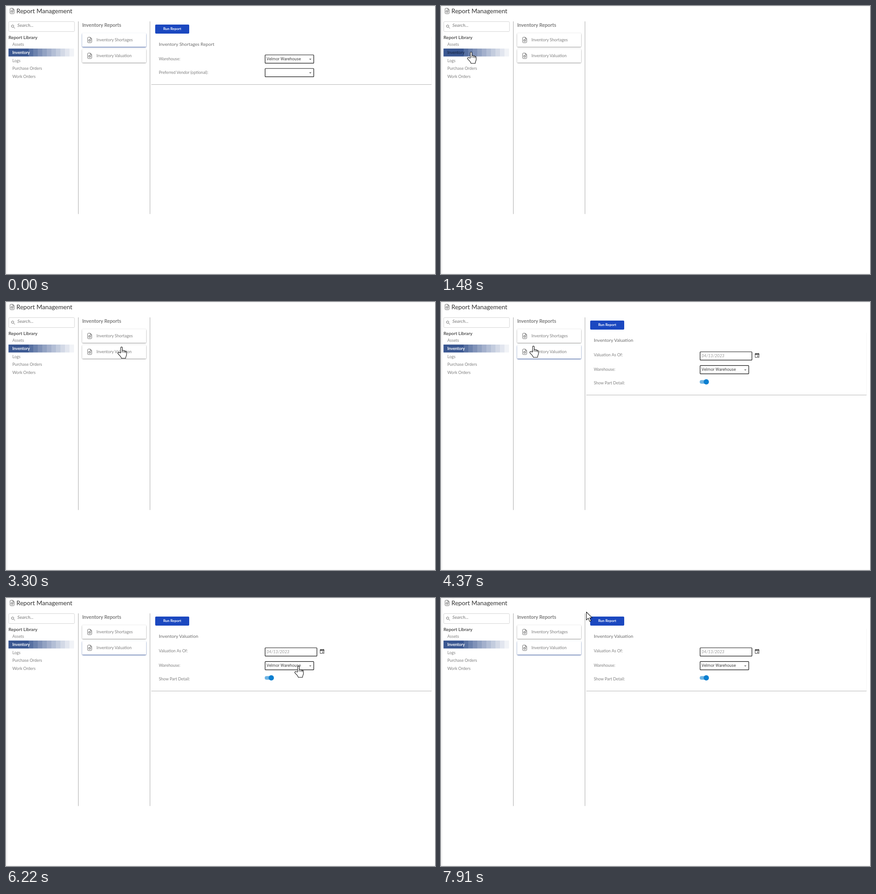
Write an HTML page that moves like this. It is 946x592 px and loops after 7990 ms.

```html
<!DOCTYPE html>
<html lang="en">
<head>
<meta charset="utf-8">
<title>Report Management</title>
<style>
html, body { margin: 0; width: 100%; height: 100%; overflow: hidden; background: #fff }
svg { display: block; width: 946px; height: 592px; font: 9px Lato, sans-serif; fill: #808080 }
.roboto { font-family: Roboto, sans-serif; fill: #444 }
.field { fill: #fff; stroke: #111; stroke-width: 1.2 }
.card { fill: #fff; filter: url(#soft) }
.card.on { filter: url(#blue) }
.cursor { fill: #fff; stroke: #111; stroke-width: 1.1; stroke-linejoin: round }
.icon { fill: none; stroke: #666 }
</style>
</head>
<body>
<svg viewBox="0 0 946 592">
  <defs>
    <filter id="soft" x="-5%" y="-20%" width="110%" height="150%"><feDropShadow dx="0" dy=".8" stdDeviation="1" flood-opacity=".5"/></filter>
    <filter id="blue" x="-5%" y="-20%" width="110%" height="150%"><feDropShadow dx="0" dy="1.2" stdDeviation="1" flood-color="#1f3f8c" flood-opacity=".85"/></filter>
    <linearGradient id="edge"><stop stop-color="#f1f1f1"/><stop offset="1" stop-color="#fff"/></linearGradient>
    <g id="doc" class="icon">
      <path d="M.5 2Q.5 .5 2 .5H6.5L9.5 3.5V11Q9.5 12.5 8 12.5H2Q.5 12.5 .5 11ZM6.5 .5V3.5H9.5"/>
      <path d="M5 5.3A2.3 2.3 0 1 0 7.3 7.6H5ZM6.2 4.7A2 2 0 0 1 8 6.4"/>
    </g>
  </defs>
  <rect width="5" height="592" fill="url(#edge)"/>
  <path d="M0 .5H946M0 591.5H946" stroke="#f0f0f0"/>
  <g id="page"></g>
  <g id="shortages"></g>
  <g id="valuation"></g>
  <path id="hand" class="cursor" d="M-2 13.5V1.9C-2 -.2 1.6 -.2 1.6 1.9V8.6C2.3 7.3 5 7.6 5.2 9.3C6 8.3 8.2 8.8 8.3 10.4C9.2 9.7 10.9 10.3 10.9 12V17C10.9 19.5 9 21 8.8 25.3H-.6C-.9 21.8 -4 20 -8 15.2C-9.2 13.3 -6.8 11.8 -5.2 12.8ZM1.6 8.6V12.5M5.2 9.3V13M8.3 10.4V13.5"/>
  <path id="arrow" class="cursor" d="M.6 .8V18.6L4.8 14.7L7.9 21.9L11 20.6L7.9 13.7H13.2Z"/>
</svg>
<script>
const LOOP = 7990;
const $ = id => document.getElementById(id);
const add = (id, html) => { $(id).innerHTML += html; };
const label = (x, y, text, attrs = '') => `<text x="${x}" y="${y}" ${attrs}>${text}</text>`;
const card = (id, y, text) => `<rect id="${id}" class="card" x="168" y="${y}" width="141" height="30" rx="2"/>
  <use href="#doc" x="179.5" y="${y + 8.5}"/>${label(199.5, y + 18.1, text, 'font-size="9.1"')}`;
const field = (y, width) => `<rect class="field" x="571.4" y="${y}" width="${width}" height="18.4" rx="1"/>`;
const select = (y, text) => field(y, 107.2) + label(574.5, y + 12, text, 'class="roboto"') +
  `<path d="M668.5 ${y + 8.6}h5l-2.5 2.7z" fill="#666"/>`;
const row = (y, text) => label(337, y, text);
const panel = (bottom, title) => `<path d="M320.5 ${bottom}H938.5" stroke="#b5b5b5"/>
  <path d="M938.5 68V${bottom}" stroke="#f5f5f5"/>
  <rect x="329" y="41" width="75" height="20" rx="2" fill="#1b48c0"/>
  ${label(366.5, 53.4, 'Run Report', 'font-size="7.9" font-weight="bold" text-anchor="middle" fill="#fff"')}
  ${label(337, 87.7, title, 'font-size="10.2" fill="#6c6c6c"')}`;

// Selected entry: solid blue, then ten-pixel bands fading to white
const band = i => {
  const fade = (i / 11) ** .8, rgb = [58, 87, 145].map(c => c + (255 - c) * fade);
  return `<rect x="${i ? 40 + 10 * i : 5.5}" y="94" width="${i ? 10 : 44.5}" height="17.5" fill="rgb(${rgb})"/>`;
};
const entries = ['Assets', 'Inventory', 'Logs', 'Purchase Orders', 'Work Orders'];

add('page', `<use href="#doc" x="8.5" y="4.5" style="stroke:#333"/>
  ${label(23, 16.3, 'Report Management', 'font-size="13.7" fill="#333"')}
  <rect x="6" y="34.5" width="145" height="22" rx="2" fill="#fff" stroke="#d4d4d4"/>
  <path class="icon" d="M16.9 46.9L19.5 49.5M12 44.5a2.6 2.6 0 1 0 5.2 0a2.6 2.6 0 1 0 -5.2 0"/>
  ${label(25, 46.3, 'Search...', 'font-size="10.2" font-style="italic" fill="#777"')}
  ${label(5.5, 73, 'Report Library', 'font-size="10" font-weight="bold" fill="#555"')}
  ${Array.from({ length: 11 }, (_, i) => band(i)).join('')}
  ${entries.map((name, i) => label(14, 88.4 + 17.55 * i, name, i === 1 ? 'id="entry"' : '')).join('')}
  <path d="M159.5 34V459.5M317.5 34V459.5" stroke="#aaa"/>
  ${label(168, 45.5, 'Inventory Reports', 'font-size="10.8" font-weight="bold" fill="#7d7d7d"')}
  ${card('first', 60, 'Inventory Shortages')}${card('second', 95, 'Inventory Valuation')}`);

add('shortages', panel(173.5, 'Inventory Shortages Report') +
  row(119.8, 'Warehouse:') + select(108, 'Velmor Warehouse') +
  row(149.8, 'Preferred Vendor (optional):') + select(138, ''));

add('valuation', panel(205.5, 'Inventory Valuation') +
  row(120, 'Valuation As Of:') + field(110, 114.2) +
  label(574.5, 122.2, '04/13/2023', 'font-size="9.2" font-style="italic" fill="#999"') +
  `<path d="M692.8 114.3h8.4v8.2h-8.4z" fill="#fff" stroke="#444"/>
   <path d="M692.3 113.8h9.4v2.6h-9.4zM694 112.6h1.3v2H694zM698.7 112.6h1.3v2h-1.3zM697.3 118.4h2.4v2.4h-2.4z" fill="#444"/>` +
  row(152.2, 'Warehouse:') + select(140.3, 'Velmor Warehouse') +
  row(182.2, 'Show Part Detail:') +
  `<rect x="570.5" y="172.4" width="18" height="8" rx="4" fill="#6db3e3"/>
   <circle cx="585" cy="176.4" r="5.8" fill="#0b7fd0"/>`);

// Pointer path: arrival time, position, pause before leaving
const stop = (time, x, y, pause = 0) => ({ time, x, y, pause });
const path = [
  stop(70, 830, 535), stop(880, 75, 107), stop(1600, 66, 101), stop(1950, 34, 101),
  stop(2290, 64, 100, 210), stop(2850, 165, 66), stop(3300, 255, 99), stop(3530, 257, 106, 650),
  stop(4370, 204, 97), stop(4760, 264, 125, 300), stop(5450, 520, 156), stop(5820, 643, 107, 140),
  stop(6220, 645, 150, 220), stop(7000, 314, 40), stop(7300, 430, 71), stop(7910, 320, 30),
];

function pointer(t) {
  const next = path.findIndex(s => s.time > t);
  if (next < 1) return path.at(next);
  const a = path[next - 1], b = path[next], leave = a.time + a.pause;
  const k = Math.max(0, (t - leave) / (b.time - leave)), e = k * k * (3 - 2 * k);
  return { x: a.x + (b.x - a.x) * e, y: a.y + (b.y - a.y) * e };
}

const show = (id, on) => $(id).setAttribute('visibility', on ? 'visible' : 'hidden');

function draw(now) {
  const t = now % LOOP, { x, y } = pointer(t);
  const inside = (left, top, right, bottom) => x > left && x < right && y > top && y < bottom;
  const started = t >= 70, early = t < 1400, late = t >= 3680;
  const overEntry = started && inside(5, 94, 151, 112);
  const clickable = overEntry || inside(5, 76, 151, 165) || inside(168, 60, 309, 125) ||
    !(early || late) === false && (inside(329, 41, 404, 61) || inside(571, 106, 679, 160));

  show('shortages', early);
  show('valuation', late);
  $('first').classList.toggle('on', early);
  $('second').classList.toggle('on', late);
  $('entry').setAttribute('fill', overEntry ? '#16213a' : '#fff');
  $('entry').setAttribute('font-weight', overEntry ? 'normal' : 'bold');
  show('arrow', started && !clickable);
  show('hand', started && clickable);
  for (const id of ['arrow', 'hand']) $(id).setAttribute('transform', `translate(${x} ${y})`);
  requestAnimationFrame(draw);
}
requestAnimationFrame(draw);
</script>
</body>
</html>
```
